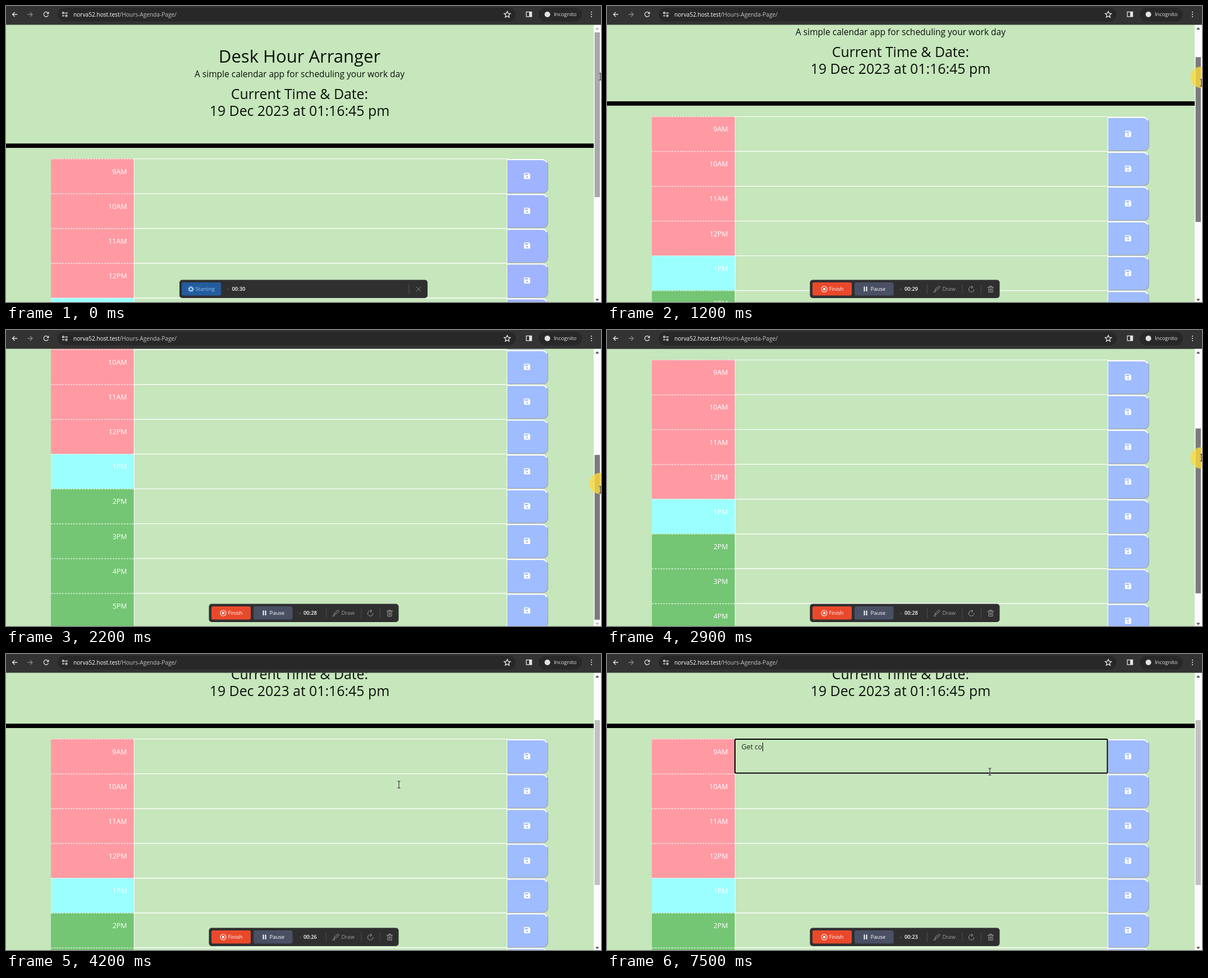
Recreate the animation shown at these times as an HTML page. Size 1060 px wide and 528 px high, loop 8000 ms.

```html
<!DOCTYPE html>
<html lang="en">
<head>
<meta charset="utf-8">
<title>Day planner</title>
<style>
  html, body { margin: 0; width: 100%; height: 100%; overflow: hidden; background: #c6e6bc; }
  svg { display: block; width: 100%; height: 100%; }
  text { font-family: "Open Sans", "Noto Sans", sans-serif; white-space: pre; }
</style>
</head>
<body>
<svg id="stage" viewBox="0 0 1060 528">
  <defs>
    <clipPath id="view"><rect y="33.5" width="1047" height="494.5"/></clipPath>
    <g id="save">
      <path d="M-5.5-4.5q0-1 1-1H3L5.5-3V4.5q0 1-1 1H-4.5q-1 0-1-1z" fill="#fff"/>
      <path d="M-4-4H2V-1.500H-4z"/>
      <circle cy="2" r="1.6"/>
    </g>
  </defs>

  <rect width="1060" height="528" fill="#c6e6bc"/>
  <g clip-path="url(#view)">
    <g id="page">
      <g text-anchor="middle" fill="#0c110b">
        <text x="523" y="101" font-size="31.04">Desk Hour Arranger</text>
        <text x="523" y="127" font-size="15.52">A simple calendar app for scheduling your work day</text>
        <text x="523" y="166" font-size="24.83">Current Time &amp; Date:</text>
        <text x="523" y="196" font-size="24.83">19 Dec 2023 at 01:16:45 pm</text>
      </g>
      <rect y="245.300" width="1047" height="7.760"/>
      <g id="rows"></g>
      <g id="focus">
        <rect x="228" y="273" width="663.500" height="60.500" rx="1.500" fill="none" stroke="#000" stroke-width="2"/>
        <text id="entry" x="239.500" y="291.300" font-size="12.42" fill="#1b241a"></text>
        <path id="caret" d="M0 279v15.500" stroke="#000"/>
      </g>
    </g>
  </g>

  <rect x="1047" y="33.500" width="13" height="494.500" fill="#fcfcfc"/>
  <path id="up" d="M1050 42l3.300-4 3.300 4z"/>
  <path id="down" d="M1050 522.500l3.300 4 3.300-4z"/>
  <rect id="thumb" x="1048.500" width="9.500" height="294"/>

  <!-- browser toolbar -->
  <rect width="1060" height="33.500" fill="#333"/>
  <rect x="92" y="3" width="816" height="24.500" rx="12.200" fill="#282828"/>
  <rect x="949" y="3" width="77" height="24.500" rx="12.200" fill="#282828"/>
  <g fill="none" stroke="#e3e3e3" stroke-width="1.300">
    <path d="M20 15H11.500m4-4-4 4 4 4"/>
    <path d="M38.500 15H47m-4-4 4 4-4 4" stroke="#858585"/>
    <path d="M75 12.500a4.200 4.200 0 1 0 .4 4M75.800 10.500v3h-3"/>
    <path d="M105 12.500h5M100 17.500h4"/>
    <circle cx="102" cy="12.500" r="1.500"/>
    <circle cx="107.500" cy="17.500" r="1.500"/>
    <path d="M893 9.500l1.600 3.600 4 .4-3 2.700.9 3.900-3.500-2-3.500 2 .9-3.900-3-2.700 4-.4z"/>
    <rect x="927" y="10.500" width="9.500" height="8.500"/>
    <path d="M934 10.500v8.500" stroke-width="4"/>
  </g>
  <g fill="#e3e3e3">
    <circle cx="964.500" cy="15" r="5"/>
    <circle cx="1043" cy="11" r="1.100"/><circle cx="1043" cy="15" r="1.100"/><circle cx="1043" cy="19" r="1.100"/>
    <text x="120" y="18.500" font-size="10.150" fill="#fff">norva52.host.test<tspan fill="#c4c4c4">/Hours-Agenda-Page/</tspan></text>
    <text x="976" y="18.300" font-size="9.300">Incognito</text>
  </g>

  <!-- recorder bar -->
  <g id="starting" font-size="9.500">
    <rect x="309" y="488.500" width="442" height="32.500" rx="5" fill="#2f2f30"/>
    <rect x="313" y="493" width="70" height="23.500" rx="3" fill="#245c9d"/>
    <circle cx="329.500" cy="505" r="2.800" fill="none" stroke="#a5d4fa" stroke-width="1.800"/>
    <circle cx="329.500" cy="505" r="4.500" fill="none" stroke="#a5d4fa" stroke-width="1.600" stroke-dasharray="1.770"/>
    <text x="337.500" y="508.400" fill="#91c5f2">Starting</text>
    <text x="394.500" y="508.400" fill="#aaa">-</text>
    <text x="402.500" y="508.400" fill="#fff" font-weight="600" font-size="9.300">00:30</text>
    <path d="M718 496v18" stroke="#555"/>
    <path d="M731 501l8 8m0-8-8 8" stroke="#888"/>
  </g>
  <g id="recording" font-size="9.500">
    <rect x="361.500" y="488.500" width="338" height="32.500" rx="5" fill="#2f2f30"/>
    <rect x="366" y="493" width="70" height="23.500" rx="3" fill="#e9492b"/>
    <rect x="441" y="493" width="69.500" height="23.500" rx="3" fill="#4a5064"/>
    <circle cx="387" cy="505" r="5" fill="none" stroke="#fff" stroke-width="1.100"/>
    <rect x="385" y="503" width="4" height="4" fill="#fff"/>
    <path d="M458.500 500.500v8.500m4-8.500v8.500" stroke="#fff" stroke-width="1.900"/>
    <g fill="#fff">
      <text x="395.500" y="508.400">Finish</text>
      <text x="469.500" y="508.400">Pause</text>
      <text x="522" y="508.400" fill="#aaa">-</text>
      <text id="clock" x="530" y="508.400" font-weight="600" font-size="9.300"></text>
      <text x="597.500" y="508.400" fill="#a0a0a0">Draw</text>
    </g>
    <path d="M570.500 496v18M633 496v18M666.500 496v18" stroke="#4b4b4b"/>
    <g fill="none" stroke="#a0a0a0">
      <path d="M581 510h5M584 508l1-3 6.500-5.500 2 2-6.500 5.500z"/>
      <path d="M651.500 501.500a4.700 4.700 0 1 0 2.300 3.500M649 499l3 2.500-3 2.500"/>
      <path d="M678 501.500h11m-9 0v9h7v-9m-5 0v-2h3v2m-2.500 2v5m2-5v5"/>
    </g>
  </g>

  <circle id="press" r="19" fill="#ffdc3c" fill-opacity=".78"/>
  <g id="cursor" fill="none">
    <path d="M-2.500-6H2.500M0-6V6M-2.500 6H2.500" stroke="#fff" stroke-opacity=".4" stroke-width="2.400"/>
    <path d="M-2.500-6H2.500M0-6V6M-2.500 6H2.500" stroke="#111"/>
  </g>
</svg>

<script>
const LOOP = 8000, STEP = 100;
const $ = id => document.getElementById(id);
const set = (id, attrs) => { for (const k in attrs) $(id).setAttribute(k, attrs[k]); };
const show = (id, on) => $(id).setAttribute("visibility", on ? "visible" : "hidden");

const scrollKeys = [[900, 0], [1200, 75.3], [1400, 112], [1500, 112], [2200, 299.5],
  [2400, 299.5], [3300, 155], [3500, 155], [3700, 121]];
const xKeys = [[3700, 1059], [4200, 700], [4400, 696], [4800, 694], [4900, 694], [5300, 682]];
const yKeys = [[0, 126], [300, 120], [700, 93], [900, 93], [1200, 137], [1400, 158], [1500, 158],
  [2200, 285], [2400, 285], [3300, 182], [3500, 182], [3700, 162], [4200, 233], [4400, 230],
  [4800, 215], [4900, 215], [5300, 210]];
const typed = "Get co";
const typeTimes = [5900, 6400, 6600, 6900, 7200, 7500];

function at(keys, t) {
  const i = keys.findIndex(k => k[0] > t);
  if (i < 0) return keys[keys.length - 1][1];
  if (i === 0) return keys[0][1];
  const [t0, a] = keys[i - 1], [t1, b] = keys[i];
  return a + (b - a) * (t - t0) / (t1 - t0);
}

function row(label, i) {
  const fill = i < 4 ? "#ff9aa3" : i === 4 ? "#9bffff" : "#74c574";
  return `<g transform="translate(0 ${272.4 + i * 62.08})">
    <rect x="80" width="148" height="62.08" fill="${fill}"/>
    <path d="M80 .5H228" stroke="#fff" stroke-dasharray="3 2"/>
    <path d="M228 .2H892.500V62.200H228.300V0" fill="none" stroke="#fff"/>
    <text x="215.500" y="27.200" text-anchor="end" font-size="12.42" fill="#fff">${label}</text>
    <path d="M893 1H955q11 0 11 11V51q0 11-11 11H893z" fill="#a5abbd"/>
    <path class="btn" d="M893 1H955q9.500 0 9.500 11V50q0 10.500-10 10.500H893z"/>
    <path d="M893 1.600H954q7 0 9.500 5" fill="none" stroke="#fff" stroke-width="2.200"/>
    <use class="btn" href="#save" x="928.300" y="30.800"/>
  </g>`;
}
$("rows").innerHTML = ["9AM", "10AM", "11AM", "12PM", "1PM", "2PM", "3PM", "4PM", "5PM"].map(row).join("");

function draw(ms) {
  const t = Math.floor(ms / STEP) * STEP;
  const scroll = at(scrollKeys, t), x = at(xKeys, t), y = at(yKeys, t);
  const dragging = t >= 700 && t < 3800;

  set("page", { transform: `translate(0 ${-scroll})` });
  set("rows", { fill: t < 100 ? "#9fb3ff" : "#9fbcff" });
  set("thumb", { y: 47 + 0.587 * scroll, fill: dragging ? "#7b7b7b" : t < 3800 ? "#a9a9a9" : "#c1c1c1" });
  set("up", { fill: scroll > 0 ? "#505050" : "#b5b5b5" });
  set("down", { fill: scroll < 299 ? "#505050" : "#b5b5b5" });

  show("starting", t < 100);
  show("recording", t >= 100);
  const left = 30 - Math.max(0, Math.floor((t - 100) / 1000));
  $("clock").textContent = "00:" + left;

  set("cursor", { transform: `translate(${x} ${y})` });
  set("press", { cx: x - 0.5, cy: at(yKeys, t - 40) - 4 });
  show("press", dragging || (t >= 5000 && t < 5200));

  show("focus", t >= 5000);
  const entry = $("entry");
  entry.textContent = typed.slice(0, typeTimes.filter(k => k <= t).length);
  const end = 240 + (entry.textContent ? entry.getComputedTextLength() : 0);
  set("caret", { transform: `translate(${Math.round(end) + 0.5} 0)` });
  show("caret", t >= 5800);
}

const start = performance.now();
function tick() {
  draw((performance.now() - start) % LOOP);
  requestAnimationFrame(tick);
}
tick();
</script>
</body>
</html>
```
